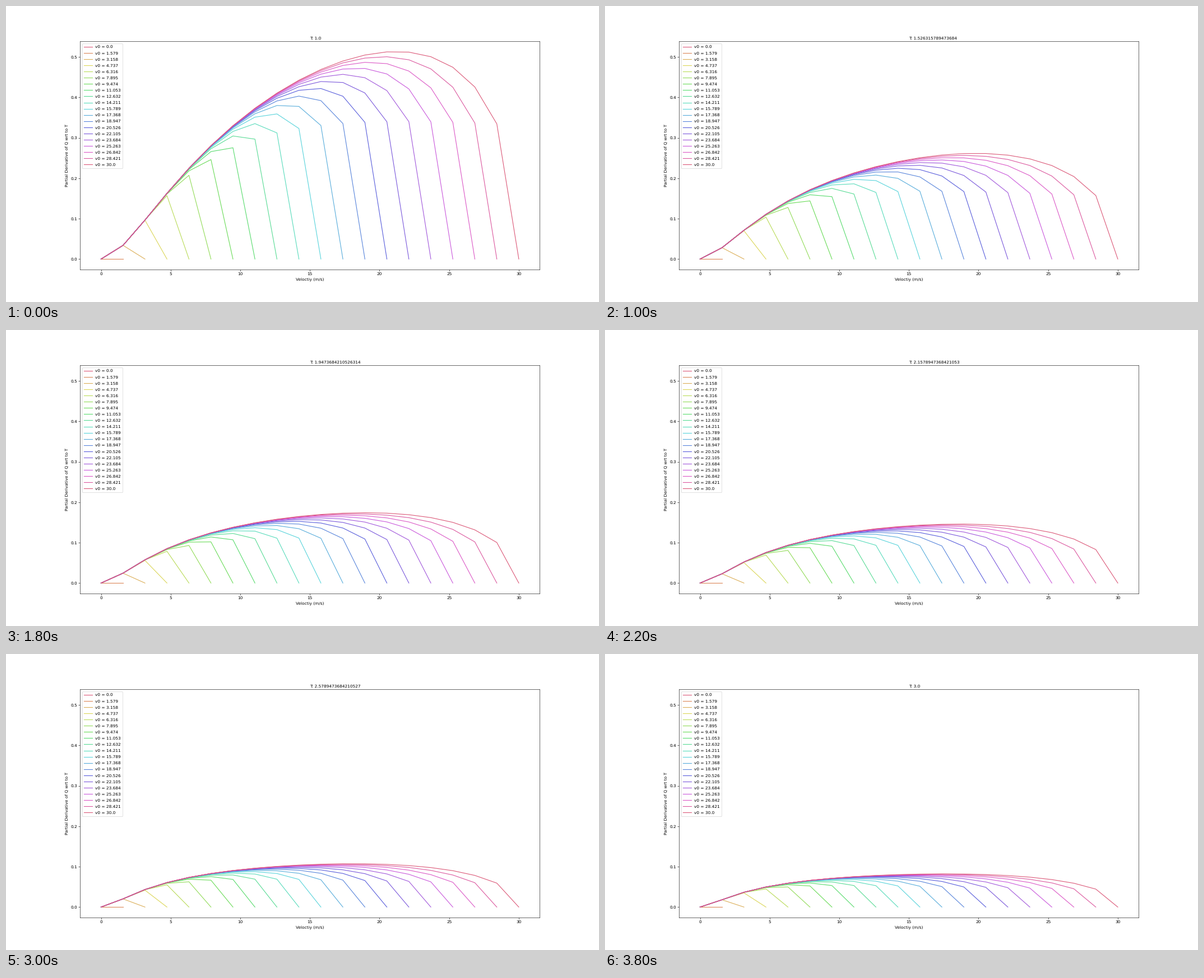
A matplotlib script that plays this animation: 1058 by 529 pixels, repeating every 4000 ms.

```python
import colorsys

import numpy as np
import matplotlib.pyplot as plt
from matplotlib.animation import FuncAnimation

plt.rcParams.update({
    "font.family": "DejaVu Sans",
    "font.size": 10,
    "text.hinting": "none",
})

DPI = 52.9
STEPS = 20
MIN_GAP = 2.0      # standstill distance, m
CAR_LENGTH = 5.0   # m

speeds = np.linspace(0, 30, STEPS)
headways = np.linspace(1, 3, STEPS)


def flow_slope(v, v0, T):
    """Size of dQ/dT at equilibrium in the car-following model."""
    if v0 == 0:
        return np.zeros_like(v)
    root = np.sqrt(1 - (v / v0) ** 4)
    return v ** 2 * root / (MIN_GAP + v * T + CAR_LENGTH * root) ** 2


def hls_color(i):
    hue = (i / STEPS + 0.01) % 1
    return colorsys.hls_to_rgb(hue, 0.6, 0.65)


fig = plt.figure(figsize=(20, 10), dpi=DPI, facecolor="white")
ax = fig.add_subplot()

lines = []
for i, v0 in enumerate(speeds):
    color = hls_color(i if i else STEPS - 1)
    line, = ax.plot([], [], color=color, lw=1.5, label=f"v0 = {round(float(v0), 3)}")
    lines.append(line)

peak = flow_slope(speeds, speeds[-1], headways[0]).max()
ax.set_xlim(-1.5, 31.5)
ax.set_ylim(-0.05 * peak, 1.05 * peak)
ax.set_xticks(range(0, 31, 5))
ax.set_yticks(np.arange(6) / 10)
ax.set_xlabel("Veloctiy (m/s)")
ax.set_ylabel("Partial Derivative of Q wrt to T")
title = ax.text(0.5, 1.01, "", transform=ax.transAxes)

# Keep the legend rows at an even pitch whatever the text height is.
em = 10 * DPI / 72
probe = fig.text(0, 0, "lp")
row_height = probe.get_window_extent(fig.canvas.get_renderer()).height
probe.remove()
row_pitch = 11.08
ax.legend(loc="upper left", labelspacing=(row_pitch - row_height) / em)


def draw(frame):
    T = headways[frame]
    title.set_text(f"T: {float(T)}")
    for i, line in enumerate(lines):
        v = speeds[:i + 1]
        line.set_data(v, flow_slope(v, speeds[i], T))
    return [*lines, title]


anim = FuncAnimation(fig, draw, frames=STEPS, interval=200,
                     init_func=lambda: draw(0), repeat=True, repeat_delay=0)
plt.show()
```
